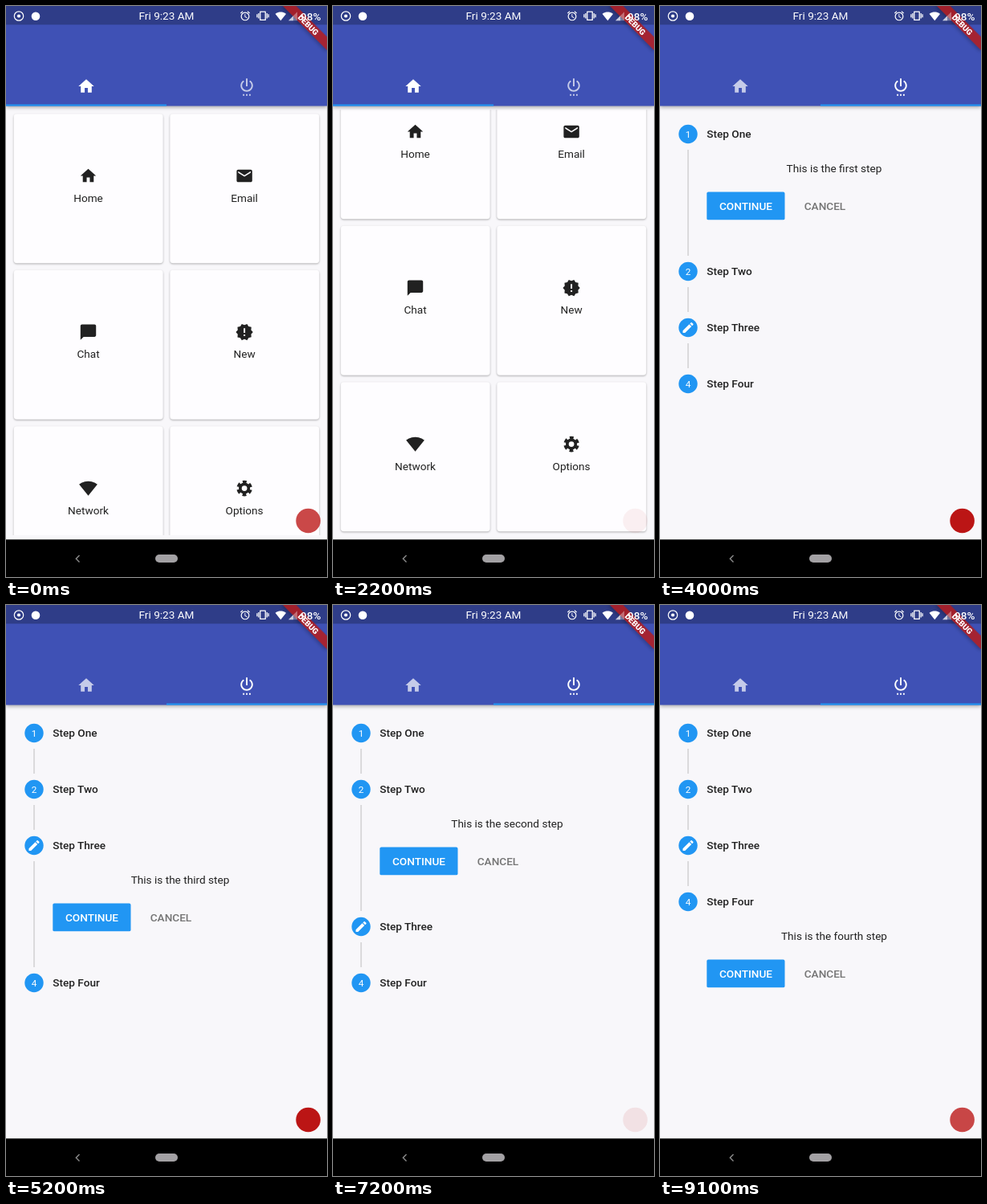
An HTML page for the animation above (9.2 s loop, 400 by 711 pixels).

```html
<!DOCTYPE html>
<html lang="en">
<head>
<meta charset="utf-8">
<title>Tabs and stepper</title>
<style>
  html, body { margin: 0; width: 100%; height: 100%; overflow: hidden; background: #000; }
  svg text { font: 13.6px Roboto, sans-serif; text-anchor: middle; fill: #212121; }
  svg .medium { font-weight: 500; }
  svg .left { text-anchor: start; }
  svg .white { fill: #fff; }
  svg .num { font-size: 11.7px; }
  svg .grey { fill: #757575; }
  svg .banner { font-size: 9.9px; font-weight: 900; }
  #stage { display: block; width: 400px; height: 711px; }
  .card { fill: #fefdff; filter: drop-shadow(0 1px 1px rgba(0,0,0,.3)); }
  .bar { filter: drop-shadow(0 2px 2px rgba(0,0,0,.3)); }
</style>
</head>
<body>
<svg id="stage" viewBox="0 0 400 711"></svg>
<script>
const LOOP = 9200;
const SCROLL = { start: 1300, length: 450, distance: 55 };
const SWIPE = { start: 2500, length: 300 };
const BODY_HEIGHT = 101;
// time, opened step
const OPENED = [[0, 0], [4200, 1], [4750, 2], [5400, 3], [6000, 0], [6600, 1], [7250, 2], [7750, 3]];
// time, opacity of the recording dot
const PULSE = [[0, .78], [150, 1], [700, .05], [1400, 1], [2150, .04], [2750, 1], [3350, .04], [4000, 1],
  [4600, .04], [5200, 1], [5900, .04], [6550, 1], [7150, .08], [7850, 1], [8500, .04], [9150, .8], [LOOP, .78]];

const PATHS = {
  home: 'M10 20v-6h4v6h5v-8h3L12 3 2 12h3v8z',
  email: 'M20 4H4c-1.1 0-2 .9-2 2v12c0 1.1.9 2 2 2h16c1.1 0 2-.9 2-2V6c0-1.1-.9-2-2-2zm0 4l-8 5-8-5V6l8 5 8-5v2z',
  chat: 'M20 2H4c-1.1 0-2 .9-2 2v18l4-4h14c1.1 0 2-.9 2-2V4c0-1.1-.9-2-2-2z',
  fresh: 'M23 12l-2.44-2.78.34-3.68-3.61-.82-1.89-3.18L12 3 8.6 1.54 6.71 4.72l-3.61.81.34 3.68L1 12l2.44 2.78-.34 3.69 3.61.82 1.89 3.18L12 21l3.4 1.46 1.89-3.18 3.61-.82-.34-3.68L23 12zm-10 5h-2v-2h2v2zm0-4h-2V7h2v6z',
  wifi: 'M12 21.5L23.64 7C23.2 6.66 18.7 3 12 3S.8 6.66.36 7z',
  power: 'M7 24h2v-2H7v2zm4 0h2v-2h-2v2zm2-22h-2v10h2V2zm3.56 2.44l-1.45 1.45C16.84 6.94 18 8.83 18 11c0 3.31-2.69 6-6 6s-6-2.69-6-6c0-2.17 1.16-4.06 2.88-5.12L7.44 4.44C5.36 5.88 4 8.28 4 11c0 4.42 3.58 8 8 8s8-3.58 8-8c0-2.72-1.36-5.12-3.44-6.56zM15 24h2v-2h-2v2z',
  edit: 'M3 17.25V21h3.75L17.81 9.94l-3.75-3.75L3 17.25zM20.71 7.04c.39-.39.39-1.02 0-1.41l-2.34-2.34c-.39-.39-1.02-.39-1.41 0l-1.83 1.83 3.75 3.75 1.83-1.83z',
  alarm: 'M22 5.72l-4.6-3.86-1.29 1.53 4.6 3.86zM7.88 3.39L6.6 1.86 2 5.71l1.29 1.53zM12.5 8H11v6l4.75 2.85.75-1.23-4-2.37V8zM12 4a9 9 0 1 0 0 18a9 9 0 1 0 0-18zm0 16a7 7 0 1 1 0-14a7 7 0 1 1 0 14z',
  vibrate: 'M0 15h2V9H0v6zm3 2h2V7H3v10zm19-8v6h2V9h-2zm-3 8h2V7h-2v10zM16.5 3h-9C6.67 3 6 3.67 6 4.5v15c0 .83.67 1.5 1.5 1.5h9c.83 0 1.5-.67 1.5-1.5v-15c0-.83-.67-1.5-1.5-1.5zM16 19H8V5h8v14z'
};
const GEAR = `<g fill="none" stroke="#212121" stroke-width="3.8"><circle cx="12" cy="12" r="5.4"/>
  <circle cx="12" cy="12" r="8.2" stroke-dasharray="4.8 3.787" stroke-dashoffset="-1.895"/></g>`;

const icon = (name, x, y, size = 23.3, fill = '#212121', id = '') =>
  `<g id="${id}" fill="${fill}" transform="translate(${x - size / 2} ${y - size / 2}) scale(${size / 24})">` +
  (name === 'gear' ? GEAR : `<path fill-rule="evenodd" d="${PATHS[name]}"/>`) + '</g>';
const text = (str, x, y, cls = '') => `<text x="${x}" y="${y}" class="${cls}">${str}</text>`;
const rect = (x, y, w, h, fill, more = '') =>
  `<rect x="${x}" y="${y}" width="${w}" height="${h}" fill="${fill}" ${more}/>`;

const cards = [['home', 'Home'], ['email', 'Email'], ['chat', 'Chat'],
  ['fresh', 'New'], ['wifi', 'Network'], ['gear', 'Options']].map(([name, label], i) => {
  const x = 9.7 + i % 2 * 194.6, y = 134.2 + (i >> 1) * 194.5;
  return `<rect class="card" x="${x}" y="${y}" width="186" height="186" rx="3.9"/>` +
    icon(name, x + 92.8, y + 77.4) + text(label, x + 92.8, y + 109.6);
}).join('');

const steps = [['One', 'first'], ['Two', 'second'], ['Three', 'third'], ['Four', 'fourth']].map(([name, nth], i) =>
  `<g id="step${i}">
    <circle cx="35" cy="0" r="11.7" fill="#2196f3"/>
    ${i === 2 ? icon('edit', 35, 0, 17.5, '#fff') : text(i + 1, 35, 4.2, 'num white')}
    ${text('Step ' + name, 58.3, 4.9, 'medium left')}
    ${i < 3 ? rect(34.5, 19.5, 1, 31, '#bdbdbd', `id="line${i}"`) : ''}
    <svg id="body${i}" x="0" y="35" width="400" height="0" overflow="hidden">
      ${text(`This is the ${nth} step`, 217, 12.4)}
      ${rect(58.3, 37, 97.2, 34.8, '#2196f3', 'rx="1.9"')}
      ${text('CONTINUE', 107, 59.3, 'medium white')}
      ${text('CANCEL', 205.5, 59.3, 'medium grey')}
    </svg>
  </g>`).join('');

const status = `
  <circle cx="16" cy="12.5" r="5.7" fill="none" stroke="#fff" stroke-width="1.2"/>
  <circle cx="16" cy="12.5" r="2.1" fill="#fff"/>
  <circle cx="37" cy="12.7" r="5.3" fill="#fff"/>
  ${text('Fri 9:23 AM', 200, 17.3, 'white')}
  ${icon('alarm', 298, 12.3, 14.5, '#fff')}
  ${icon('vibrate', 320, 12.3, 15.5, '#fff')}
  ${icon('wifi', 342.3, 12.7, 14, '#fff')}
  <path d="M352 18.2l11-11v11z" fill="#fff" opacity=".35"/>
  <path d="M352 18.2l6-6v6z" fill="#fff" opacity=".6"/>
  ${text('98%', 367, 17.5, 'white medium left')}`;

const stage = document.getElementById('stage');
stage.innerHTML = `
  <clipPath id="view"><rect y="129.3" width="400" height="529.8"/></clipPath>
  ${rect(0, 0, 400, 711, '#f8f7fa')}
  <g id="grid"><g clip-path="url(#view)"><g id="list">${cards}</g></g></g>
  <g id="stepper">${steps}</g>
  ${rect(0, 0, 400, 124.5, '#3f51b5', 'class="bar"')}
  ${rect(0, 0, 400, 23.3, '#2f3d88')}
  ${icon('home', 100, 100, 23.3, '#fff', 'tab0')}
  ${icon('power', 300, 100, 23.3, '#fff', 'tab1')}
  ${rect(0, 122.5, 200, 2, '#2196f3', 'id="marker"')}
  <g transform="translate(400 0) rotate(45)">
    ${rect(-39, 27.2, 78, 11.7, '#b71c1c', 'opacity=".85" class="bar"')}
    ${text('DEBUG', 0, 36.6, 'banner white')}
  </g>
  ${status}
  <circle id="dot" cx="376.6" cy="641" r="15.3" fill="#bb1515"/>
  ${rect(0, 664.3, 400, 46.7, '#000')}
  <path d="M91.5 684l-4.2 4.2 4.2 4.2" fill="none" stroke="#8c8c8c" stroke-width="1.4"/>
  ${rect(186, 683, 28, 10, '#a3a1a4', 'rx="5"')}`;

const $ = id => document.getElementById(id);
const set = (id, name, value) => $(id).setAttribute(name, value);
const clamp = v => Math.max(0, Math.min(1, v));
const smooth = v => v * v * (3 - 2 * v);
const easeOut = v => 1 - (1 - v) ** 3;

// cubic-bezier(.4, 0, .2, 1)
function standard(x) {
  let lo = 0, hi = 1, u;
  for (let i = 0; i < 16; i++) {
    u = (lo + hi) / 2;
    if (1.2 * u * (1 - u) ** 2 + .6 * u * u * (1 - u) + u ** 3 < x) lo = u; else hi = u;
  }
  return smooth(u);
}

function pulse(t) {
  const i = PULSE.findIndex(key => key[0] > t);
  const [t0, a] = PULSE[i - 1], [t1, b] = PULSE[i];
  return a + (b - a) * smooth((t - t0) / (t1 - t0));
}

// linear progress of each step body, 0 closed to 1 open
function openness(step, t) {
  const i = OPENED.findLastIndex(key => key[0] <= t);
  const p = i ? clamp((t - OPENED[i][0]) / 200) : 1;
  if (OPENED[i][1] === step) return p;
  return i && OPENED[i - 1][1] === step ? 1 - p : 0;
}

function draw(t) {
  const scrolled = SCROLL.distance * easeOut(clamp((t - SCROLL.start) / SCROLL.length));
  const page = standard(clamp((t - SWIPE.start) / SWIPE.length));
  set('list', 'transform', `translate(0 ${-scrolled})`);
  set('grid', 'transform', `translate(${-400 * page} 0)`);
  set('stepper', 'transform', `translate(${400 - 400 * page} 0)`);
  set('marker', 'x', 200 * page);
  set('tab0', 'opacity', 1 - .3 * page);
  set('tab1', 'opacity', .7 + .3 * page);
  set('dot', 'opacity', pulse(t));

  let y = 159.5;
  for (let i = 0; i < 4; i++) {
    const open = openness(i, t), height = BODY_HEIGHT * standard(open);
    set('step' + i, 'transform', `translate(0 ${y})`);
    set('body' + i, 'height', height);
    set('body' + i, 'opacity', standard(clamp((open - .4) / .6)));
    if (i < 3) set('line' + i, 'height', 31 + height);
    y += 70 + height;
  }
}

function tick() {
  draw(performance.now() % LOOP);
  requestAnimationFrame(tick);
}
tick();
</script>
</body>
</html>
```
